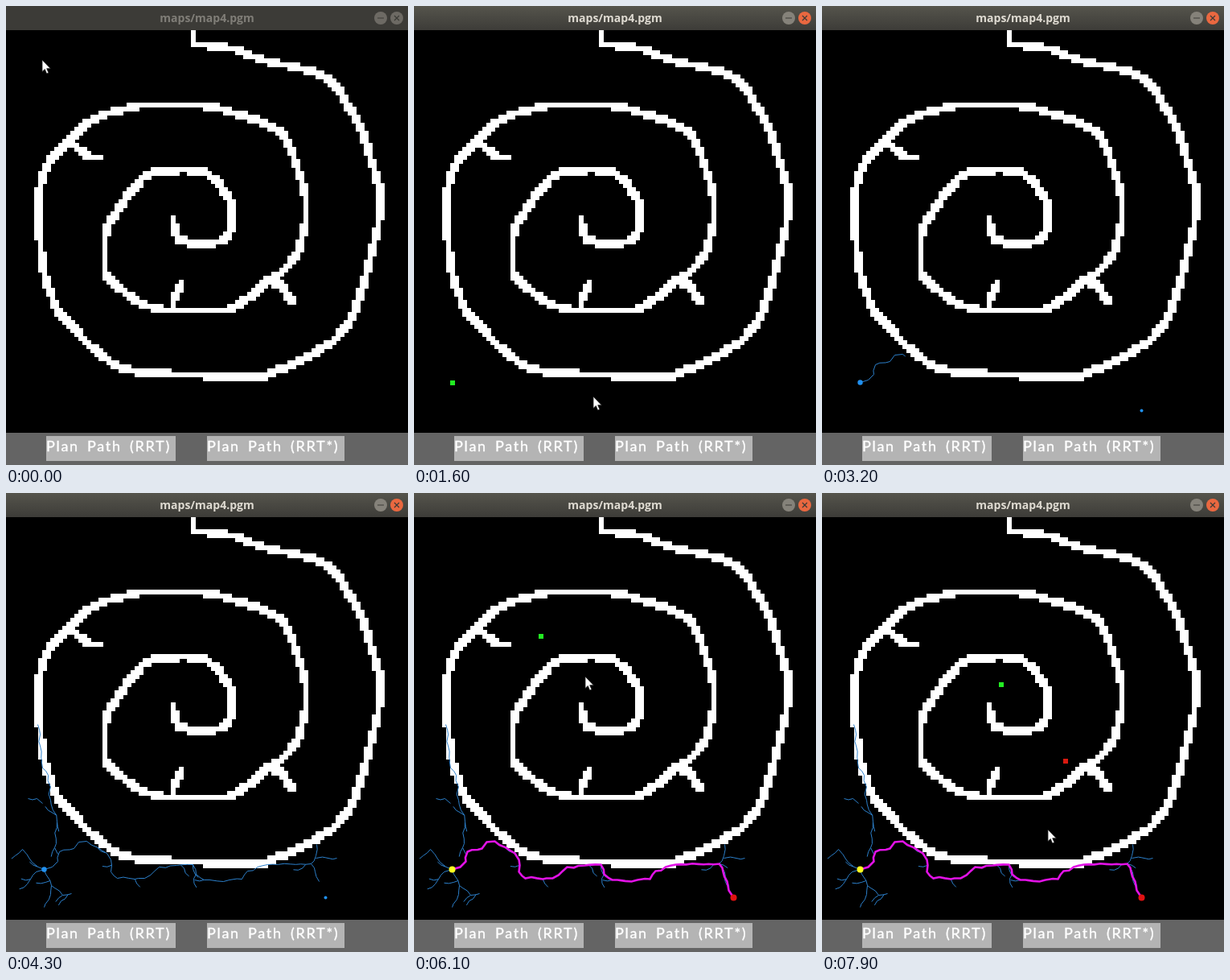
An HTML page that plays this animation: 500x570 px, repeating every 8000 ms.

```html
<!DOCTYPE html>
<html lang="en">
<head>
<meta charset="utf-8">
<title>Path planner</title>
<style>
  html, body { margin: 0; width: 100%; height: 100%; overflow: hidden; background: #000; }
  svg { display: block; width: 500px; height: 570px; }
  .title { font: 700 14px "Open Sans", "Noto Sans", sans-serif; text-anchor: middle; fill: #dfdbd2; }
  .label { font: 400 18px Lato, sans-serif; letter-spacing: 1.7px; word-spacing: 4px; fill: #fff; stroke: #fff; stroke-width: .4; }
  .crisp { shape-rendering: crispEdges; }
  .tree path { fill: none; stroke: #2c80cc; stroke-width: 1; }
  .glyph { fill: none; stroke: #3c3b37; stroke-width: 1.2; }
  .idle .bar { fill: #3c3b37; }
  .idle .title { fill: #807e78; }
  .idle .knob { fill: #6d6a64; }
</style>
</head>
<body>
<svg viewBox="0 0 500 570">
  <defs>
    <linearGradient id="bar" x2="0" y2="1">
      <stop offset="0" stop-color="#55544c"/>
      <stop offset="1" stop-color="#3d3c38"/>
    </linearGradient>
  </defs>
  <rect width="500" height="570"/>
  <g id="head">
    <rect class="bar" width="500" height="30" fill="url(#bar)"/>
    <text class="title" x="250" y="20">maps/map4.pgm</text>
    <circle class="knob" cx="466" cy="15" r="8" fill="#85827a"/>
    <circle class="knob" cx="486" cy="15" r="8" fill="#ea6840"/>
    <path class="glyph" d="M462 15h8M483 12l6 6m0-6l-6 6"/>
  </g>
  <path id="walls" class="crisp" fill="#fff"/>
  <g id="tree" class="tree"></g>
  <path id="route" fill="none" stroke="#e212e6" stroke-width="2.6"/>
  <circle id="startDot" cx="47.5" cy="467.5"/>
  <circle id="goalDot" cx="397.5" cy="502.5"/>
  <rect id="start" class="crisp" width="6" height="6" fill="#22ee22"/>
  <rect id="goal" class="crisp" width="6" height="6" fill="#da1a10"/>
  <rect y="530" width="500" height="40" fill="#646464"/>
  <rect x="50" y="534" width="161" height="31" fill="#b4b4b4"/>
  <rect x="250" y="534" width="171" height="31" fill="#b4b4b4"/>
  <text class="label" x="50" y="553">Plan Path (RRT)</text>
  <text class="label" x="250" y="553">Plan Path (RRT*)</text>
  <path id="cursor" d="M0 0V14.5L3.3 11.5L5.6 17L8 16L5.7 10.7H10.3Z" fill="#fff" stroke="#222" stroke-width=".8"/>
</svg>
<script>
const LOOP = 8000, STEP = 100, CELL = 5;
const GROW = 3020, DONE = 5800, SPEED = 0.42;
const $ = id => document.getElementById(id);
const points = s => s.split(' ').map(p => p.split(',').map(Number));
const line = pts => 'M' + pts.map(([x, y]) => `${x + .5} ${y + .5}`).join('L');
const snap = v => Math.floor(v / CELL) * CELL;
const dist = (a, b) => Math.hypot(b[0] - a[0], b[1] - a[1]);

let seed = 7;
const random = () => {
  seed = (seed * 16807) % 2147483647;
  return seed / 2147483647;
};
const spread = r => (random() * 2 - 1) * r;

// Walls: smooth strokes with a small brush, stamped on the cell grid.
const strokes = [
  '232,32 232,47',
  '232,47 280,52 320,67 385,82 410,100 440,150 455,195 465,230 465,258 457,296 447,335 430,385 405,417 360,442 315,460 255,460 240,458 205,457 195,455 168,455 135,445 105,422 65,378 48,335 43,300 40,280 40,232 52,195 78,165',
  '78,165 110,139 145,128 170,123 240,123 268,128 315,143 345,160 362,200 372,235 372,270 362,305 345,328 325,341 300,363 272,377 200,377 165,367 124,333 124,280 145,243 170,213 188,205 243,205 268,225 280,248 280,275 270,290 252,295 230,295 212,286 208,263',
  '78,165 85,173 103,187 118,187',
  '207,375 208,364 218,342',
  '330,341 342,348 357,367'
].map(points);

// Hermite spline with slightly tight tangents.
function curve(pts, visit) {
  for (let i = 0; i < pts.length - 1; i++) {
    const b = pts[i], c = pts[i + 1], a = pts[i - 1] || b, d = pts[i + 2] || c;
    const n = Math.ceil(dist(b, c) * 2);
    for (let j = 0; j <= n; j++) {
      const u = j / n, v = 1 - u;
      visit(...[0, 1].map(k =>
        b[k] * v * v * (1 + 2 * u) + c[k] * u * u * (3 - 2 * u) +
        .3 * u * v * (v * (c[k] - a[k]) - u * (d[k] - b[k]))));
    }
  }
}

function stampWalls() {
  const cells = new Set();
  for (const s of strokes) curve(s, (x, y) => {
    for (const dx of [-1, 1]) for (const dy of [-1, 1])
      cells.add(`M${snap(x + dx)} ${snap(y + dy)}h6v6h-6z`);
  });
  return [...cells].join('');
}

// Tree: stems wander between key points and sprout twigs away from the spiral.
const branches = [];

function wander(pts) {
  const out = [pts[0]];
  for (let i = 1; i < pts.length; i++) {
    const [a, b] = [pts[i - 1], pts[i]], n = Math.max(1, Math.round(dist(a, b) / 7));
    for (let j = 1; j <= n; j++)
      out.push([0, 1].map(k => a[k] + (b[k] - a[k]) * j / n + (j < n ? spread(1.6) : 0)));
  }
  return out;
}

function addBranch(pts, at) {
  const el = document.createElementNS('http://www.w3.org/2000/svg', 'path');
  el.setAttribute('d', line(pts));
  $('tree').append(el);
  branches.push({ at, el, len: el.getTotalLength() });
}

function sprout([x, y], at) {
  let angle = Math.atan2(y - 250, x - 250) + spread(1.1);
  const pts = [[x, y]];
  for (let n = 1 + random() * 2; n > 0; n--) {
    angle += spread(.6);
    pts.push([x += 6 * Math.cos(angle), y += 6 * Math.sin(angle)]);
  }
  addBranch(pts, at);
}

function stem(keys, at, density) {
  const pts = wander(points(keys));
  addBranch(pts, at);
  pts.reduce((a, b) => {
    at += dist(a, b) / SPEED;
    if (random() < density) sprout(b, at + 150 + random() * 400);
    return b;
  });
  return pts;
}

const trunk = stem('47,467 57,464 64,457 66,445 84,441 90,433 100,432 125,447 130,455 130,470 138,478 172,478 190,464 232,461 236,473 246,480 270,482 293,479 300,469 325,461 379,460', GROW, .22);
const tail = stem('379,460 384,470 389,482', 4180, .4);
stem('64,448 60,440 63,408 55,381 52,350 45,341 39,287', 3280, .3);
stem('45,385 38,379 27,379', 3800, 0);
stem('47,467 32,458 20,442', 3300, .5);
stem('47,467 37,470 26,485', 3350, .5);
stem('47,467 56,487 70,499 81,497', 3300, .35);
stem('56,487 55,498 47,514', 3500, .2);
stem('379,460 385,450 386,436', 4100, 0);
stem('385,453 411,453', 4150, 0);

// Pointer stops: time, x, y, what is clicked there.
const stops = [
  [0, 45, 67], [600, 173, 288, 'start'], [900, 153, 331],
  [1100, 48, 467], [1300, 48, 467, 'start'], [1900, 398, 503, 'goal'], [2100, 398, 503],
  [2300, 289, 523], [2500, 185, 547], [2800, 185, 547, 'plan'], [2900, 185, 580],
  [5700, 230, 580], [6000, 158, 178, 'start'], [6100, 213, 228],
  [6300, 223, 238, 'start'], [7000, 303, 333, 'goal'], [LOOP, 279, 427]
];

function pointer(t) {
  const i = stops.findIndex(s => s[0] > t);
  const [t0, x0, y0] = stops[i - 1], [t1, x1, y1] = stops[i];
  const k = (t - t0) / (t1 - t0);
  return [x0 + (x1 - x0) * k, y0 + (y1 - y0) * k];
}

const show = (el, on) => { el.style.display = on ? '' : 'none'; };

function mark(id, clicks) {
  const last = clicks.filter(s => s[3] === id || s[3] === 'plan').pop();
  const on = last && last[3] === id;
  show($(id), on);
  if (on) {
    $(id).setAttribute('x', snap(last[1]));
    $(id).setAttribute('y', snap(last[2]));
  }
}

function dot(id, planned, done, r, color) {
  show($(id), planned);
  $(id).setAttribute('r', done ? 4 : r);
  $(id).setAttribute('fill', done ? color : '#2090f0');
}

function draw(t) {
  const clicks = stops.filter(s => s[3] && s[0] <= t);
  const planned = clicks.some(s => s[3] === 'plan'), done = t >= DONE;
  $('head').setAttribute('class', clicks.length ? '' : 'idle');
  mark('start', clicks);
  mark('goal', clicks);
  dot('startDot', planned, done, 3.2, '#ffff20');
  dot('goalDot', planned, done, 2, '#e01212');
  for (const { at, el, len } of branches) {
    const grown = (t - at) * SPEED;
    show(el, grown > 0);
    el.style.strokeDasharray = grown < len ? `${Math.max(0, grown)} ${len}` : 'none';
  }
  show($('route'), done);
  const [x, y] = pointer(t);
  show($('cursor'), y < 570);
  $('cursor').setAttribute('transform', `translate(${Math.round(x)} ${Math.round(y)})`);
}

$('walls').setAttribute('d', stampWalls());
$('route').setAttribute('d', line([...trunk, ...tail, [391, 493], [397, 502]]));

const begin = performance.now();
function tick() {
  const t = (performance.now() - begin) % LOOP;
  draw(Math.floor(t / STEP) * STEP);
  requestAnimationFrame(tick);
}
tick();
</script>
</body>
</html>
```
